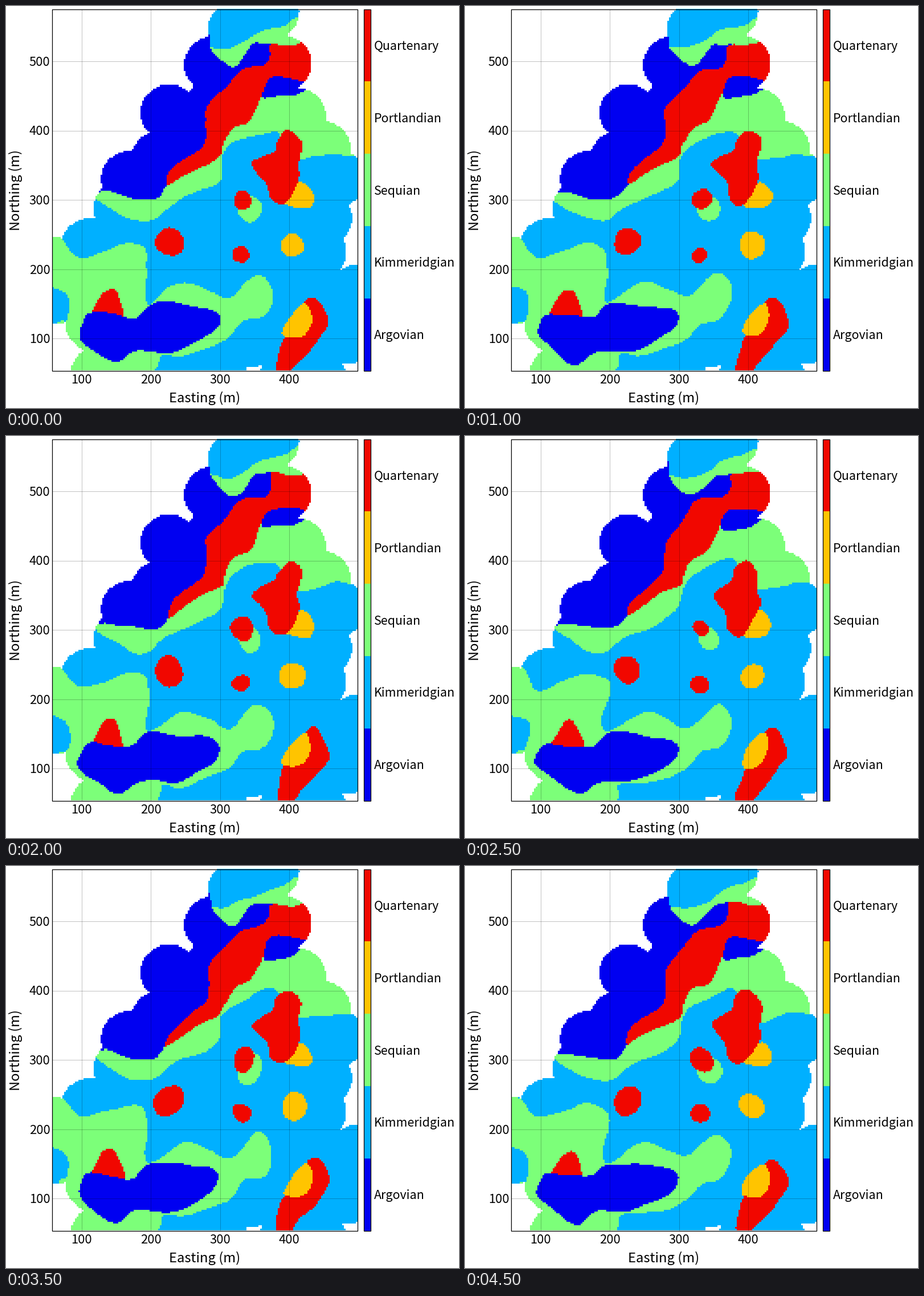
A matplotlib script that plays this animation: 795x705 px, repeating every 5000 ms.

```python
import numpy as np
import matplotlib.pyplot as plt
from matplotlib.animation import FuncAnimation
from matplotlib.patches import Rectangle
from matplotlib.path import Path

W, H, DPI = 795, 705, 100
X0, X1, Y0, Y1 = 80, 616, 5, 639          # map frame in pixels
COLS, ROWS = 176, 209
FRAMES, STEP = 10, 500
REACH = 50                                # mapped distance around a borehole
WHITE, ARGO, KIMM, SEQU, PORT, QUAT = range(6)
NAMES = ["Argovian", "Kimmeridgian", "Sequian", "Portlandian", "Quartenary"]
COLORS = np.array([(1, 1, 1)] + [plt.cm.jet(v)[:3] for v in (.1, .3, .5, .7, .9)])
FONT = "Noto Sans CJK JP"

# Outer boreholes, in order around the survey
holes = [(464, 10), (403, 43), (362, 103), (285, 187), (268, 270), (216, 304),
         (203, 355), (146, 422), (86, 456), (88, 507), (153, 556), (163, 645),
         (374, 650), (429, 583), (495, 650), (545, 650), (600, 577), (616, 503),
         (546, 430), (556, 372), (580, 302), (554, 252), (511, 194), (485, 101)]

# Key points of each outcrop
north_green = [(350, 72), (385, 74), (420, 60), (450, 43), (488, 34), (520, 23),
               (560, 90), (470, 95), (400, 115)]
mid_green = [(148, 326), (182, 355), (215, 375), (250, 376), (285, 350), (345, 323),
             (376, 303), (381, 265), (400, 242), (450, 222), (475, 222), (500, 268),
             (545, 265), (575, 259), (620, 247), (570, 120), (460, 145), (370, 245),
             (260, 325), (180, 305)]
south_green = [(60, 400), (97, 408), (127, 442), (170, 430), (212, 416), (246, 428),
               (249, 465), (242, 505), (250, 521), (290, 495), (322, 485), (358, 500),
               (392, 511), (425, 478), (445, 470), (464, 490), (464, 520), (447, 546),
               (415, 556), (380, 588), (310, 613), (272, 612), (248, 645), (85, 650),
               (90, 562), (108, 548), (107, 505), (60, 478)]
north_argo = [(338, 45), (362, 78), (399, 105), (432, 69), (450, 67), (475, 68),
              (480, 95), (400, 180), (320, 285), (285, 314), (262, 337), (225, 338),
              (180, 325), (140, 312), (200, 120)]
south_argo = [(143, 538), (185, 541), (222, 546), (248, 524), (285, 520), (325, 526),
              (362, 532), (374, 548), (355, 574), (298, 606), (235, 604), (195, 626),
              (148, 600), (126, 578), (130, 556)]
strip = [(464, 67), (500, 67), (540, 67), (545, 138), (500, 129), (466, 127),
         (452, 150), (441, 173), (425, 203), (398, 216), (381, 246), (376, 264),
         (340, 280), (308, 301), (284, 315), (289, 292), (316, 267), (346, 240),
         (352, 205), (353, 178), (385, 142), (412, 113), (450, 106), (462, 88)]
lens = [(466, 127), (500, 127), (527, 137), (505, 155), (480, 160), (452, 162),
        (453, 143)]
hill = [(147, 540), (165, 508), (182, 497), (196, 508), (203, 550), (150, 550)]
east_red = [(475, 235), (495, 219), (517, 238), (513, 275), (515, 305), (488, 347),
            (463, 339), (454, 310), (431, 278), (445, 265), (470, 253)]
wedge = [(488, 345), (515, 309), (538, 330), (528, 351)]
south_red = [(500, 565), (526, 520), (547, 517), (569, 556), (550, 585), (523, 614),
             (498, 645), (474, 640), (484, 590)]
leaf = [(485, 578), (495, 548), (524, 523), (534, 550), (515, 577)]

outcrops = [(SEQU, north_green), (SEQU, mid_green), (SEQU, south_green),
            (ARGO, north_argo), (QUAT, hill), (ARGO, south_argo), (QUAT, strip),
            (ARGO, lens), (PORT, wedge), (QUAT, south_red), (PORT, leaf)]
spots = [(SEQU, 427, 356, 22), (QUAT, 414, 340, 17), (QUAT, 285, 412, 26),
         (QUAT, 412, 435, 15), (PORT, 502, 421, 22)]


def curve(pts, n=8):
    """Closed Catmull-Rom curve through the points."""
    p1 = np.asarray(pts, float)[:, None]
    p0, p2, p3 = (np.roll(p1, k, axis=0) for k in (1, -1, -2))
    t = np.arange(n)[None, :, None] / n
    out = p1 + .5 * t * (p2 - p0 + t * (2 * p0 - 5 * p1 + 4 * p2 - p3
                                        + t * (3 * (p1 - p2) + p3 - p0)))
    return out.reshape(-1, 2)


def circle(x, y, r):
    a = np.linspace(0, 2 * np.pi, 32, endpoint=False)
    return np.column_stack([x + r * np.cos(a), y + r * np.sin(a)])


def wobble(rng, waves=5, size=1.5):
    """Random smooth shift of the plane: a sum of a few plane waves."""
    k = 2 * np.pi / rng.uniform(60, 130, waves)
    angle, phase = rng.uniform(0, 2 * np.pi, (2, waves))
    push = rng.normal(0, size, (waves, 2))

    def shift(pts):
        along = pts[:, :1] * np.cos(angle) + pts[:, 1:] * np.sin(angle)
        return pts + np.sin(k * along + phase) @ push
    return shift


gx, gy = np.meshgrid(X0 + (np.arange(COLS) + .5) * (X1 - X0) / COLS,
                     Y0 + (np.arange(ROWS) + .5) * (Y1 - Y0) / ROWS)
CELLS = np.column_stack([gx.ravel(), gy.ravel()])


def inside(pts):
    return Path(pts).contains_points(CELLS)


survey = inside(holes)
for hole in holes:
    survey |= np.hypot(*(CELLS - hole).T) < REACH


def geology(i):
    """One random realisation of the map."""
    rng = np.random.default_rng(40 + i)
    shift = wobble(rng)
    cells = np.full(len(CELLS), KIMM)
    for unit, pts in outcrops:
        cells[inside(shift(curve(pts)))] = unit
    for unit, x, y, r in spots:
        cells[inside(shift(circle(x, y, r + rng.uniform(-3, 3))))] = unit
    cells[inside(shift(curve(east_red)))] = QUAT
    cells[~survey] = WHITE
    return COLORS[cells].reshape(ROWS, COLS, 3)


maps = [geology(i) for i in range(FRAMES)]

fig = plt.figure(figsize=(W / DPI, H / DPI), dpi=DPI, facecolor="white")
ax = fig.add_axes([0, 0, 1, 1])
ax.axis("off")
image = ax.imshow(maps[0], extent=(X0, X1, Y1, Y0), aspect="auto",
                  interpolation="nearest")
ax.set_xlim(-.5, W - .5)
ax.set_ylim(H - .5, -.5)


def label(x, y, text, px, ha="center", **kw):
    ax.text(x, y, text, fontsize=px * 72 / DPI, family=FONT, color="black",
            ha=ha, va="baseline", **kw)


grid = dict(color="black", alpha=.28, lw=.6)
for k in range(5):
    x, y = 132 + 121.5 * k, 582.5 - 121.5 * k
    if x < X1:
        ax.plot([x, x], [Y0, Y1], **grid)
        label(x, 661, 100 * (k + 1), 22)
    ax.plot([X0, X1], [y, y], **grid)
    label(77, y + 8, 100 * (k + 1), 22, ha="right")
label(348, 694, "Easting (m)", 23.8)
label(23.5, 323, "Northing (m)", 23.8, rotation=90, rotation_mode="anchor")

band = (Y1 - Y0) / 5
for k, name in enumerate(NAMES):
    top = Y1 - (k + 1) * band
    ax.add_patch(Rectangle((627, top), 12.5, band, fc=COLORS[k + 1], ec="none"))
    label(645, top + band / 2 + 8, name, 21.4, ha="left")
for x, w in ((X0, X1 - X0), (627, 12.5)):
    ax.add_patch(Rectangle((x, Y0), w, Y1 - Y0, fc="none", ec="black", lw=.9))


def draw(i):
    image.set_data(maps[i])
    return [image]


anim = FuncAnimation(fig, draw, frames=FRAMES, interval=STEP, repeat=True,
                     repeat_delay=0, blit=False)
plt.show()
```
